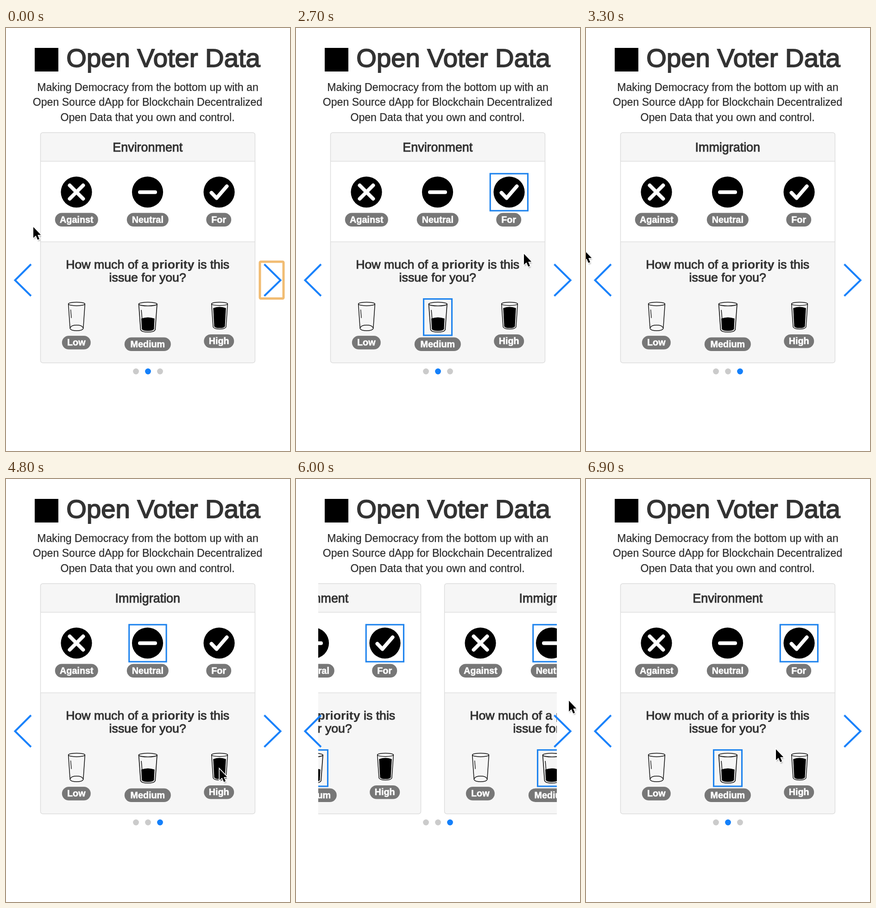
These frames come from a looping animation (613 by 914 pixels, 7200 ms). An HTML page:

```html
<!DOCTYPE html>
<html lang="en">
<head>
<meta charset="utf-8">
<title>Open Voter Data</title>
<style>
  html, body { margin: 0; width: 100%; height: 100%; overflow: hidden; background: #fff; }
  svg { display: block; width: 100vw; height: 100vh; }
  text { font-family: "Liberation Sans", Arial, sans-serif; text-anchor: middle; fill: #333; }
  .title { font-size: 56.2px; stroke: #333; stroke-width: 1.9; }
  .lead { font-size: 23.1px; fill: #2b2b2b; stroke: #2b2b2b; stroke-width: .25; }
  .head { font-size: 26.9px; stroke: #333; stroke-width: 1; }
  .ask { font-size: 26.7px; stroke: #333; stroke-width: 1; }
  .ask .strong { font-weight: bold; stroke-width: .2; }
  .badge { font-size: 19.8px; font-weight: bold; fill: #fff; stroke: #fff; stroke-width: .6; }
  .pick { fill: none; stroke: #1e83ee; stroke-width: 3.1; }
  .mark { fill: none; stroke: #fff; stroke-width: 8; stroke-linecap: round; stroke-linejoin: round; }
  .glass { fill: none; stroke: #111; stroke-width: 1.6; stroke-linecap: round; }
  .arrow { fill: none; stroke: #1a82fb; stroke-width: 4; }
</style>
</head>
<body>
<svg viewBox="0 0 613 914">
  <defs>
    <clipPath id="window"><rect x="48" y="220" width="515" height="510"/></clipPath>
    <filter id="soft" x="-50%" y="-50%" width="200%" height="200%"><feGaussianBlur stdDeviation="1.6"/></filter>
    <path id="pointer" d="M0 0V23.5L5.4 18.5L9.3 27.5L13 25.9L9.2 17H16.2Z"/>
  </defs>
  <rect width="613" height="914" fill="#fff"/>
  <rect x="62" y="43" width="51" height="51"/>
  <text class="title" x="339.5" y="83.5">Open Voter Data</text>
  <text class="lead" x="306" y="135.5">Making Democracy from the bottom up with an</text>
  <text class="lead" x="305.5" y="168">Open Source dApp for Blockchain Decentralized</text>
  <text class="lead" x="305.5" y="200.5">Open Data that you own and control.</text>
  <g clip-path="url(#window)"><g id="track"></g></g>
  <polyline class="arrow" points="54,510.5 19.5,545 54,579"/>
  <polyline class="arrow" points="557.5,510.5 592.5,545 557.5,579"/>
  <rect id="ring" x="548" y="505" width="51" height="79.5" rx="2" fill="none" stroke="#f1bc73" stroke-width="5"/>
  <g id="dots"></g>
  <g id="cursor">
    <use href="#pointer" x="1.5" y="3" opacity=".4" filter="url(#soft)"/>
    <use href="#pointer" stroke="#fff" stroke-width="3.2"/>
    <use href="#pointer"/>
  </g>
</svg>
<script>
const STEP = 300, STEPS = 24, SPAN = 514;
const byId = id => document.getElementById(id);

const badge = (x, y, w, label) => `
  <rect x="${x - w / 2}" y="${y}" width="${w}" height="29.5" rx="14.75" fill="#777"/>
  <text class="badge" x="${x}" y="${y + 21.3}">${label}</text>`;

const choice = (x, mark) => `
  <circle cx="${x}" cy="354.5" r="33.6"/><path class="mark" d="${mark}"/>`;

// Drawn in a 40 by 66 cell; level is the height of the liquid's surface.
function glass(x, w, h, level) {
  const inset = 4.2 + level * .06;
  const fill = level
    ? `<path fill="#000" stroke="none" d="M${inset} ${level}Q20 ${level - 5} ${40 - inset} ${level}L32.5 58.5Q31 62.5 20 62.5T7.5 58.5Z"/>`
    : '<path stroke-width="1.4" d="M6 58Q7.5 52.5 20 52.5T34 58"/>';
  return `<g class="glass" transform="translate(${x - w / 2} 591.5) scale(${w / 40} ${h / 66})">
    ${fill}
    <ellipse cx="20" cy="5" rx="18.8" ry="4"/>
    <path d="M1.2 5L5 60Q7 65 20 65T35 60L38.8 5"/>
    <path stroke-width="1.4" d="M6.5 18L8 36"/></g>`;
}

const pick = (id, x, y, w, h) =>
  `<rect id="${id}" class="pick" x="${x}" y="${y}" width="${w}" height="${h}"/>`;

const card = (name, dx, picks) => `<g transform="translate(${dx} 0)">
  <rect x="74.5" y="226" width="463" height="497.5" rx="5" fill="#f6f6f6"/>
  <rect x="74.5" y="288" width="463" height="174" fill="#fff"/>
  <path d="M75 288H537M75 462H537" stroke="#e0e0e0" stroke-width="1.4"/>
  <rect x="74.5" y="226" width="463" height="497.5" rx="5" fill="none" stroke="#dcdcdc" stroke-width="1.4"/>
  <text class="head" x="305.8" y="267">${name}</text>
  ${choice(152, 'M137.5 340L166.5 369M166.5 340L137.5 369')}
  ${choice(305.5, 'M289 354.8H322')}
  ${choice(460, 'M443.5 356L454.5 367.5L476.5 342')}
  ${badge(152.3, 399.5, 93, 'Against')}
  ${badge(305.8, 399.5, 90, 'Neutral')}
  ${badge(459.2, 399.5, 54, 'For')}
  <text class="ask" x="305.7" y="520">How much of a <tspan class="strong">priority</tspan> is this</text>
  <text class="ask" x="305.7" y="548">issue for you?</text>
  ${glass(152.5, 38, 63.5, 0)}
  ${glass(306.3, 42, 66.5, 36)}
  ${glass(461, 37, 60, 15)}
  ${badge(151.8, 665, 62, 'Low')}
  ${badge(305.8, 668.5, 100, 'Medium')}
  ${badge(459.7, 662, 65, 'High')}
  ${picks}</g>`;

byId('track').innerHTML =
  card('Environment', 0, pick('for', 419.2, 314.8, 81.2, 80) + pick('medium1', 275.5, 585.5, 61, 78.5)) +
  card('Immigration', SPAN, pick('neutral', 265.7, 314.8, 80.4, 80) + pick('medium2', 275.5, 585.5, 61, 78.5));
byId('dots').innerHTML = [280.5, 306.5, 332.5]
  .map(x => `<circle cx="${x}" cy="742" r="6.4"/>`).join('');

// Pointer tip for every step
const tips = [
  [59, 430], [310, 415], [451, 421], [455, 421], [458, 376], [458, 403],
  [324, 581], [310, 634], [436, 471], [492, 488], [245, 485], [-4, 480],
  [379, 374], [303, 348], [303, 348], [431, 573], [461, 627], [332, 627],
  [320, 631], [320, 453], [589, 479], [640, 479], [392, 432], [410, 584]
];

const show = (id, on) => byId(id).setAttribute('visibility', on ? 'visible' : 'hidden');
const move = (id, x, y) => byId(id).setAttribute('transform', `translate(${x} ${y})`);

function pan(step) {
  if (step === 10) return -247;
  if (step === 20) return 246 - SPAN;
  return step > 10 && step < 20 ? -SPAN : 0;
}

function draw(step) {
  move('track', pan(step), 0);
  move('cursor', ...tips[step]);
  show('ring', step < 5);
  show('for', step >= 5);
  show('medium1', step >= 7);
  show('neutral', step >= 14);
  show('medium2', step >= 18);
  const active = step >= 11 && step <= 20 ? 2 : 1;
  [...byId('dots').children].forEach((dot, i) =>
    dot.setAttribute('fill', i === active ? '#1480fa' : '#cbcbcb'));
}

const start = performance.now();
function tick() {
  draw(Math.floor((performance.now() - start) / STEP) % STEPS);
  requestAnimationFrame(tick);
}
tick();
</script>
</body>
</html>
```
